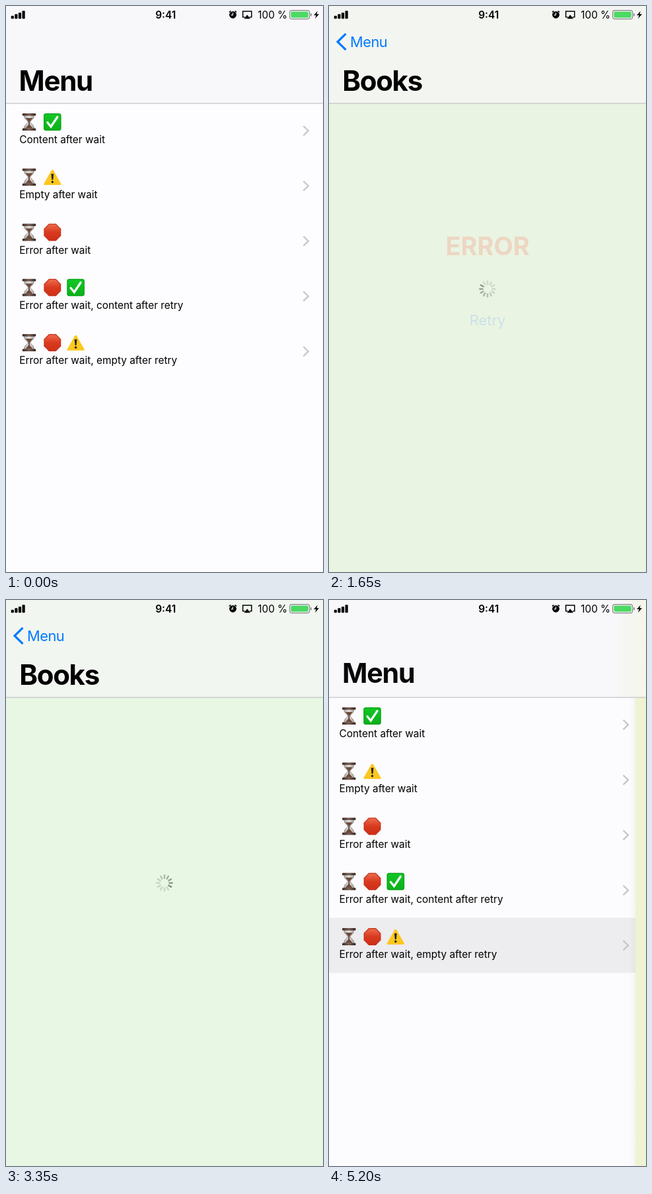
Recreate the animation shown at these times as an HTML page with a canvas. Size 480 by 854 pixels, loop 5250 ms.

```html
<!DOCTYPE html>
<html lang="en">
<head>
<meta charset="utf-8">
<title>Menu</title>
<style>
html, body { margin: 0; height: 100%; overflow: hidden; background: #fdfcfe; }
canvas { display: block; width: 100vw; height: 100vh; }
</style>
</head>
<body>
<canvas id="stage" width="480" height="854"></canvas>
<script>
const W = 480, H = 854, LOOP = 5250, BAR = 147, BLUE = '#007aff';
const TAP = 500, PUSH = 516.6, RETRY = 2700, BACK = 4750, POP = 4914;
const g = document.getElementById('stage').getContext('2d');

const clamp = v => Math.max(0, Math.min(1, v));
const lerp = (a, b, k) => a + (b - a) * k;
const ease = v => { v = clamp(v); return v * v * (3 - 2 * v); };

// Critically damped spring used by both page transitions
function spring(ms) {
  if (ms <= 0) return 0;
  if (ms > 520) return 1;
  const x = ms * 0.01826;
  return 1 - (1 + x) * Math.exp(-x);
}
const pushed = (t, lag = 0) => t < POP ? spring(t - PUSH - lag) : 1 - spring(t - POP - lag);
const pageX = p => Math.round(W * (1 - p));

function withAlpha(a, draw) {
  g.save();
  g.globalAlpha *= clamp(a);
  draw();
  g.restore();
}
function at(x, y, draw) {
  g.save();
  g.translate(x, y);
  draw();
  g.restore();
}
function rect(x, y, w, h, fill, r = 0) {
  g.fillStyle = fill;
  g.beginPath();
  g.roundRect(x, y, w, h, r);
  g.fill();
}
function trace(pts, close) {
  g.beginPath();
  for (let i = 0; i < pts.length; i += 2) g.lineTo(pts[i], pts[i + 1]);
  if (close) g.closePath();
}
function shape(fill, ...pts) {
  trace(pts, true);
  g.fillStyle = fill;
  g.fill();
}
function line(color, width, ...pts) {
  trace(pts);
  g.strokeStyle = color;
  g.lineWidth = width;
  g.stroke();
}
function text(str, x, y, size, color, weight = 400, align = 'left', spacing = 0) {
  g.font = `${weight} ${size}px Inter, Roboto, sans-serif`;
  g.letterSpacing = spacing + 'px';
  g.textAlign = align;
  g.fillStyle = color;
  g.fillText(str, x, y);
}
function fade(x0, y0, x1, y1, ...colors) {
  const f = g.createLinearGradient(x0, y0, x1, y1);
  colors.forEach((c, i) => f.addColorStop(i / (colors.length - 1), c));
  return f;
}

// Row icons, each centred on the origin
const icons = {
  wait() {
    g.beginPath();
    g.moveTo(-7.5, -10);
    g.bezierCurveTo(-7.5, -3, -2, -3, -2, 0);
    g.bezierCurveTo(-2, 3, -7.5, 3, -7.5, 10);
    g.lineTo(7.5, 10);
    g.bezierCurveTo(7.5, 3, 2, 3, 2, 0);
    g.bezierCurveTo(2, -3, 7.5, -3, 7.5, -10);
    g.closePath();
    g.fillStyle = fade(-8, 0, 8, 0, '#a8a3a1', '#e6e3e2', '#a09b99');
    g.fill();
    g.lineWidth = 0.8;
    g.strokeStyle = '#8b8480';
    g.stroke();
    shape('#6b4a3a', -5.5, -6, 5.5, -6, 1, -0.5, 1, 4, 5.5, 9.5, -5.5, 9.5, -1, 4, -1, -0.5);
    for (const y of [-13, 9.5]) rect(-10.2, y, 20.4, 3.6, fade(-10, 0, 10, 0, '#3b2a24', '#7a6056', '#35241e'), 1.2);
  },
  done() {
    rect(-13.3, -13, 26.6, 26, '#07a315', 3.5);
    rect(-12, -11.8, 24, 23.6, fade(0, -12, 0, 12, '#12c726', '#0bb11b'), 2.5);
    g.lineCap = 'round';
    line('#fff', 3.2, -7.5, 0.8, -2.3, 7, 7.5, -7.5);
  },
  warn() {
    g.lineJoin = 'round';
    shape('#fdc81f', 0, -10.5, 12, 10.5, -12, 10.5);
    line('#fdc81f', 2.4, 0, -10.5, 12, 10.5, -12, 10.5, 0, -10.5);
    shape('#26231e', -1.9, -5, 1.9, -5, 1, 4, -1, 4);
    g.beginPath();
    g.arc(0, 7.2, 1.7, 0, 7);
    g.fill();
  },
  stop() {
    const ring = r => [...Array(8)].flatMap((_, i) => {
      const a = (i + 0.5) * Math.PI / 4;
      return [r * Math.cos(a), r * Math.sin(a)];
    });
    shape('#c4321c', ...ring(14));
    shape(fade(0, -12, 0, 12, '#ee6a4c', '#d93a1f', '#cf2f17'), ...ring(12.6));
  }
};

const rows = [
  ['wait done', 'Content after wait'],
  ['wait warn', 'Empty after wait'],
  ['wait stop', 'Error after wait'],
  ['wait stop done', 'Error after wait, content after retry'],
  ['wait stop warn', 'Error after wait, empty after retry']
];

function drawMenu(t, p) {
  rect(0, 0, W, H, '#fdfcfe');
  const selected = t < TAP ? 0 : clamp(1 - (t - POP) / 454);
  withAlpha(selected, () => rect(0, 479.5, W, 83, '#d3d3d3'));
  at(-0.3 * W * p, 0, () => rows.forEach(([names, label], i) => at(0, 83.25 * i, () => {
    names.split(' ').forEach((n, k) => at(35 + 35.3 * k, 175, icons[n]));
    text(label, 20.3, 207, 15.4, '#000');
    line('#c7c7cc', 2.3, 450.3, 181, 457.8, 188.2, 450.3, 195.4);
  })));
  rect(0, 0, W, H, `rgba(0,0,0,${0.1 * p})`);
}

function drawSpinner(t) {
  const head = Math.floor((t - (t < RETRY ? 742 : 2975)) * 0.012);
  g.lineCap = 'round';
  for (let i = 0; i < 12; i++) {
    const age = (((head - i) % 12) + 12) % 12;
    at(240, 427, () => {
      g.rotate(i * Math.PI / 6);
      line(`rgba(60,66,60,${Math.max(0.18, 0.6 - age * 0.065)})`, 2.4, 0, -7.4, 0, -11.7);
    });
  }
}

const loading = { page: '#e7f7e3', bar: '#f2f6f1', draw: drawSpinner };
const failed = {
  page: '#f7e3e0', bar: '#f8f2f1',
  draw(t) {
    text('ERROR', 240, 376, 38, '#ff2600', 700, 'center');
    withAlpha(t < RETRY ? 1 : 0.25, () => text('Retry', 240, 482, 21.8, BLUE, 400, 'center'));
  }
};
const empty = {
  page: '#eef3d1', bar: '#f6f6ec',
  draw() { text('EMPTY', 240, 376, 38, '#ffd072', 700, 'center', -1.4); }
};
const steps = [[loading, -1000], [failed, 1580], [loading, 2760], [empty, 3755]];

// Cross-dissolves through the states reached so far
function eachState(t, draw) {
  for (const [state, start] of steps) {
    const a = ease((t - start) / 300);
    if (a > 0) withAlpha(a, () => draw(state));
  }
}

function drawPage(t, p) {
  const x = pageX(p);
  if (x > 0) rect(x - 10, BAR, 10, H, fade(x - 10, 0, x, 0, 'rgba(0,0,0,0)', `rgba(0,0,0,${0.02 + 0.22 * p})`));
  at(x, 0, () => eachState(t, s => {
    rect(0, 0, W, H, s.page);
    s.draw(t);
  }));
}

function drawBar(t, p) {
  const x = pageX(p), popping = t >= POP;
  const edge = lerp(27, 473, x / W);
  rect(0, 0, W, BAR, '#f8f7fa');
  rect(0, 0, W, BAR, `rgba(0,0,0,${0.025 * p * (p < 1)})`);
  if (p > 0) eachState(t, s =>
    rect(0, 0, W, BAR, x > 2 ? fade(edge - 22, 0, edge + 22, 0, s.bar + '00', s.bar) : s.bar));
  rect(0, 146.5, W, 1, '#b9b8bb');

  // Titles trail the page slightly
  const k = pushed(t, popping ? 7 : 11);
  const dim = lerp(1, 0.3, clamp((t - BACK + 20) / 150));
  const menu = color => text('Menu', lerp(19.6, 32, k), lerp(127.5, 62, k), lerp(42, 21.8, k),
    color, Math.round(400 + 300 * Math.sqrt(1 - k)), 'left', lerp(-1.3, -0.5, k));
  withAlpha(1 - k, () => menu('#000'));
  withAlpha(k ** 1.4 * dim, () => menu(BLUE));
  withAlpha(popping ? dim * (1 - (t - POP) / 35) : dim * (k - 0.4) / 0.5,
    () => line(BLUE, 3.2, 25.5, 41.8, 13, 54, 25.5, 66.2));
  withAlpha(popping ? k : 1 - (1 - k) ** 3,
    () => text('Books', 20.2 + W * (1 - k), 127.5, 42, '#000', 700, 'left', -1.3));
}

function drawStatus() {
  [4.6, 7, 9.4, 12].forEach((h, i) => rect(7.7 + 5.6 * i, 19.3 - h, 4.2, h, '#000', 1));
  text('9:41', 241.7, 18.6, 15.4, '#000', 600, 'center');

  // Alarm clock
  g.beginPath();
  g.arc(343.5, 13.3, 5.4, 0, 7);
  g.fill();
  g.lineCap = 'round';
  line('#000', 1.6, 338.4, 9, 339.8, 7.8);
  line('#000', 1.6, 347.2, 7.8, 348.6, 9);
  line('#fff', 1.1, 343.5, 10.4, 343.5, 13.6, 341.2, 13.6);

  // Screen sharing
  line('#000', 1.5, 361, 16.8, 358.6, 16.8, 358.6, 8, 371.8, 8, 371.8, 16.8, 369.4, 16.8);
  shape('#000', 365.2, 13.2, 370, 19.2, 360.4, 19.2);

  text('100 %', 381.3, 18.6, 15.3, '#000');
  g.strokeStyle = '#85858a';
  g.lineWidth = 1.2;
  g.beginPath();
  g.roundRect(429.6, 6.6, 30, 13, 3.4);
  g.stroke();
  rect(431.4, 8.4, 26.4, 9.4, '#4cd964', 2);
  rect(461, 11, 1.7, 4.4, '#85858a', 0.8);
  shape('#000', 471.8, 7.6, 466, 14, 469.6, 14, 468, 19, 474, 12.2, 470.3, 12.2);
}

function frame() {
  const t = performance.now() % LOOP, p = pushed(t);
  g.clearRect(0, 0, W, H);
  g.save();
  if (p < 1) drawMenu(t, p);
  g.restore();
  if (p > 0) drawPage(t, p);
  g.lineCap = 'butt';
  g.lineJoin = 'miter';
  drawBar(t, p);
  drawStatus();
  g.lineCap = 'butt';
  requestAnimationFrame(frame);
}
frame();
</script>
</body>
</html>
```
